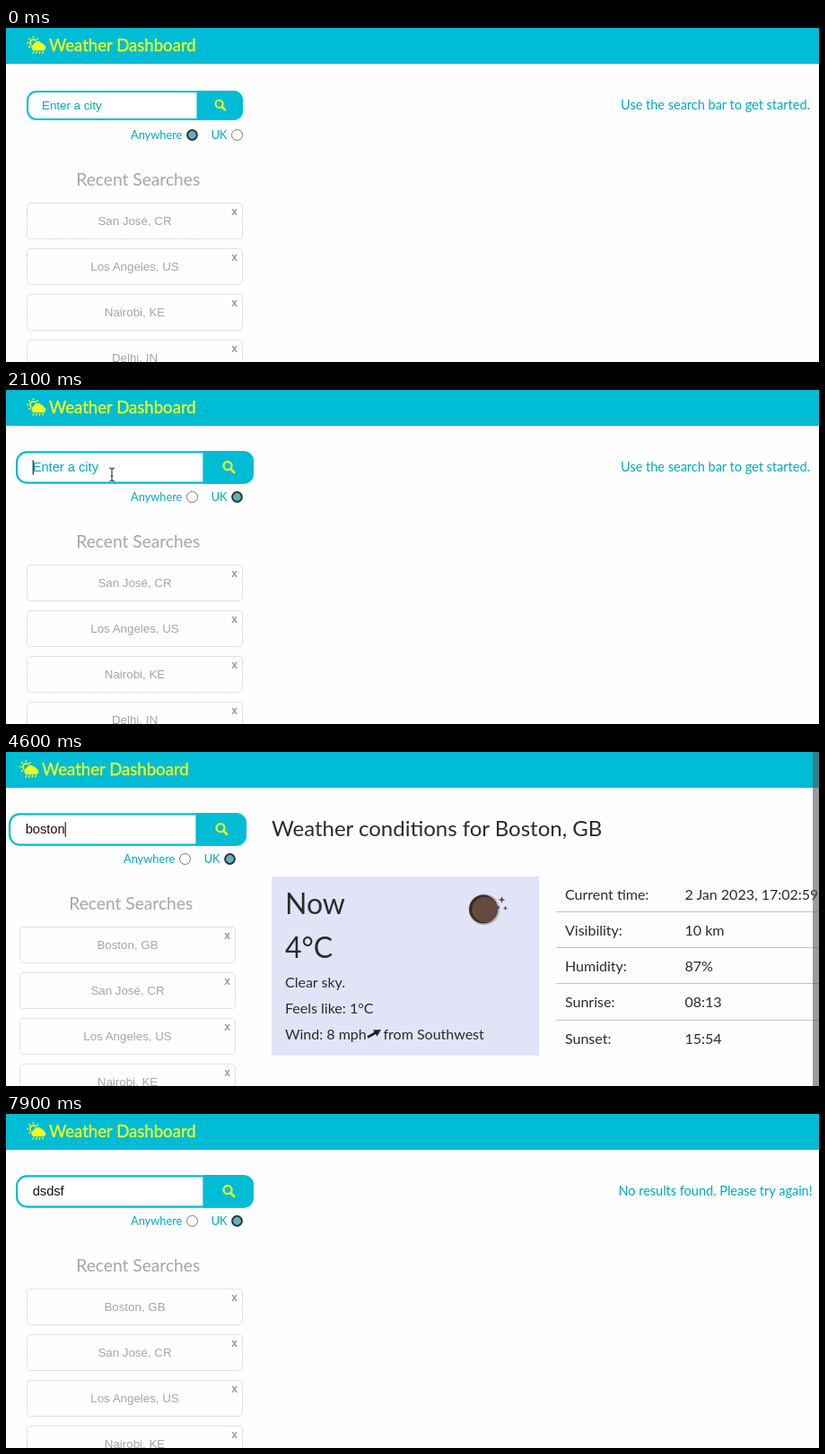
Animation of 906x373 px, one loop 8 s. Source, as an HTML page:

```html
<!DOCTYPE html>
<html lang="en">
<head>
<meta charset="utf-8">
<title>Weather Dashboard</title>
<style>
  html, body { margin: 0; width: 100%; height: 100%; overflow: hidden; background: #fefefe; }
  svg { display: block; width: 100%; height: 100%; }
  text { font-family: Lato, sans-serif; white-space: pre; }
  .ui { font-family: "Liberation Sans", Arial, sans-serif; font-size: 13.33px; }
  .title { font-size: 18.6px; fill: #f0fb20; stroke: #f0fb20; stroke-width: .35; }
  .cyan { fill: #00a9c0; }
  .message { font-size: 14.5px; text-anchor: middle; }
  .label { font-size: 12.8px; }
  .grey { fill: #a6a6a6; text-anchor: middle; }
  .recent { font-size: 19.2px; }
  .close { font-size: 12px; font-weight: 700; fill: #999; }
  .card { fill: none; stroke: #c4c4c4; stroke-dasharray: 1 1; }
  .dark { fill: #2b2b2b; font-size: 16px; }
  .heading { font-size: 24px; }
  .big { font-size: 32px; }
</style>
</head>
<body>
<svg id="stage" viewBox="0 0 906 373">
  <rect width="906" height="40" fill="#00bcd4"/>
  <g id="page">
    <g id="logo" fill="#f0fb20" stroke="#f0fb20">
      <circle cx="30.5" cy="16.5" r="3.6" fill="none" stroke-width="1.8"/>
      <g id="rays" stroke-width="1.7"></g>
      <path stroke="#00bcd4" stroke-width="1"
        d="M31 25.5a4 4 0 0 1-.3-7.8a5 5 0 0 1 8.8-1.5a3.2 3.2 0 0 1 3 2.5a3.5 3.5 0 0 1-.5 6.8z"/>
      <path d="M31 26l-.9 2.2M34.5 26l-.9 2.2M38 26l-.9 2.2M41.5 26l-.9 2.2" stroke-width="1.3" stroke-linecap="round"/>
    </g>
    <text class="title" x="48" y="26">Weather Dashboard</text>

    <g id="search">
      <rect x="24" y="71" width="239" height="31" rx="10" fill="#fff" stroke="#00bcd4" stroke-width="2"/>
      <path d="M212.5 70H254a10 10 0 0 1 10 10V93a10 10 0 0 1-10 10H212.5z" fill="#00bcd4"/>
      <circle cx="237.6" cy="84.8" r="4.1" fill="none" stroke="#f0fb20" stroke-width="2"/>
      <path d="M240.7 88l3.4 3.4" stroke="#f0fb20" stroke-width="2.5" stroke-linecap="round"/>
      <rect id="selection" x="40" y="78.7" height="15.4" fill="#b3d7fb"/>
      <text id="field" class="ui" x="40" y="91"></text>
      <rect id="caret" y="79" width="1" height="15" fill="#111"/>
    </g>

    <text class="cyan label" x="139" y="124">Anywhere</text>
    <circle id="anywhere" cx="207.5" cy="119.5"/>
    <text class="cyan label" x="228.7" y="124">UK</text>
    <circle id="uk" cx="257.5" cy="119.5"/>

    <text class="grey recent" x="147.3" y="176">Recent Searches</text>
    <g id="cards"></g>
  </g>

  <text id="message" class="cyan message" x="790.5" y="91"></text>

  <g id="results">
    <text class="dark heading" x="296" y="94.3">Weather conditions for Boston, GB</text>
    <rect x="296" y="139" width="298" height="200" fill="#e1e4f6"/>
    <text class="dark big" x="311" y="181">Now</text>
    <text class="dark big" x="311" y="230">4°C</text>
    <text class="dark" x="311" y="263">Clear sky.</text>
    <text class="dark" x="311" y="292">Feels like: 1°C</text>
    <text class="dark" x="311" y="320.5">Wind: 8 mph</text>
    <path d="M403 318.5l9-5" stroke="#222" stroke-width="2.6"/>
    <path d="M409 310.5l9-.5l-4.5 7.5z" fill="#222"/>
    <text class="dark" x="420.5" y="320.5">from Southwest</text>
    <circle cx="533" cy="176" r="17.3" fill="#b9b5b5"/>
    <circle cx="532" cy="175.5" r="16" fill="#382b27"/>
    <circle cx="533.5" cy="176" r="14.3" fill="#654a3e"/>
    <g id="stars" fill="#57504f"></g>
    <g id="table"></g>
    <rect x="899" width="7" height="373" fill="#555" opacity=".58"/>
  </g>

  <path id="arrow" d="M0 0V11.5L2.7 9L4.7 13.4L6.8 12.5L4.9 8.2H8.3z" fill="#111" stroke="#fff" stroke-width=".8"/>
  <path id="beam" d="M-3-7q3 0 3 2.5q0-2.5 3-2.5M0-5V6M-3 8q3 0 3-2.5q0 2.5 3 2.5M-1.5 2h3" fill="none" stroke="#333" stroke-width="1.1"/>
</svg>
<script>
const LOOP = 8000, STEP = 100;
const $ = id => document.getElementById(id);

function add(parent, tag, attrs, text = "") {
  const node = document.createElementNS("http://www.w3.org/2000/svg", tag);
  for (const key in attrs) node.setAttribute(key, attrs[key]);
  node.textContent = text;
  parent.append(node);
  return node;
}
const show = (node, on) => node.style.display = on ? "" : "none";

for (let i = 0; i < 8; i++) {
  add($("rays"), "path", { d: "M30.5 11.2V9.2", transform: `rotate(${i * 45} 30.5 16.5)` });
}

const cityLabels = [0, 1, 2, 3].map(i => {
  const y = 195 + 51 * i;
  add($("cards"), "rect", { class: "card", x: 23.5, y: y + .5, width: 240, height: 40, rx: 4 });
  add($("cards"), "text", { class: "ui grey close", x: 254.5, y: y + 14 }, "x");
  return add($("cards"), "text", { class: "ui grey", x: 143.5, y: y + 25 });
});

for (const [x, y, r] of [[552.5, 165, 4], [548.5, 173.5, 2.5], [556.5, 174.5, 2.7]]) {
  const d = r * .28;
  add($("stars"), "path", { d: `M${x} ${y - r}l${d} ${r - d}l${r - d} ${d}l${d - r} ${d}l${-d} ${r - d}l${-d} ${d - r}l${d - r} ${-d}l${r - d} ${-d}z` });
}

const rows = [["Current time:", ""], ["Visibility:", "10 km"], ["Humidity:", "87%"],
              ["Sunrise:", "08:13"], ["Sunset:", "15:54"]];
const values = rows.map(([name, value], i) => {
  const y = 164.8 + 40.2 * i;
  if (i) add($("table"), "path", { d: `M613 ${Math.round(y - 27) + .5}H906`, stroke: "#c2c2c2" });
  add($("table"), "text", { class: "dark", x: 623, y }, name);
  return add($("table"), "text", { class: "dark", x: 756.5, y }, value);
});

const START = "Use the search bar to get started.";
const NONE = "No results found. Please try again!";

// start, typed text, caret (1) or selection (2), message, clock when results are open
const scenes = [
  [0, "", 0, START], [2000, "", 1, START], [2600, "", 0, START],
  [3000, "b", 1, START], [3100, "bo", 1, START], [3400, "bos", 1, START],
  [3600, "bost", 1, START], [4000, "boston", 1, START], [4200, "boston", 1, ""],
  [4300, "boston", 0, "", "02:59"], [4600, "boston", 1, "", "02:59"],
  [5000, "boston", 0, "", "03:00"], [5500, "boston", 1, "", "03:00"],
  [6000, "boston", 2, "", "03:01"], [6500, "d", 1, "", "03:01"],
  [7000, "dsd", 1, "", "03:02"], [7200, "dsdsf", 1, "", "03:02"],
  [7400, "dsdsf", 1, NONE], [7900, "dsdsf", 0, NONE]
];

// time, x, y
const mousePath = [[300, 560, 330], [600, 355, 212], [900, 270, 141], [1100, 258, 121],
                   [1400, 256, 120], [1700, 185, 106], [2000, 122, 94], [2100, 118, 94]];

function mouseAt(t) {
  const i = mousePath.findIndex(point => point[0] > t);
  if (i < 0) return mousePath.at(-1).slice(1);
  const [t0, x0, y0] = mousePath[i - 1], [t1, x1, y1] = mousePath[i];
  const k = (t - t0) / (t1 - t0);
  return [x0 + (x1 - x0) * k, y0 + (y1 - y0) * k];
}

function setRadio(node, on) {
  node.setAttribute("r", on ? 5.4 : 6);
  node.setAttribute("fill", on ? "#5cb3bd" : "#fff");
  node.setAttribute("stroke", on ? "#30383a" : "#777");
  node.setAttribute("stroke-width", on ? 2 : 1);
}

function render(t) {
  const [, typed, caret, message, clock] = scenes.findLast(scene => scene[0] <= t);
  const open = Boolean(clock), field = $("field");

  $("page").setAttribute("transform", `translate(${open ? -8 : 0})`);
  const zoom = t < 2000 ? 1 : t < 2100 ? 1.07 : 1.1;
  $("search").setAttribute("transform", `translate(143.5 86.5) scale(${zoom}) translate(-143.5 -86.5)`);
  field.textContent = typed || "Enter a city";
  field.setAttribute("fill", typed ? "#111" : "#00a9c0");
  const width = typed ? field.getComputedTextLength() : 0;
  $("caret").setAttribute("x", 40 + width);
  $("selection").setAttribute("width", width);
  show($("caret"), caret === 1);
  show($("selection"), caret === 2);

  setRadio($("anywhere"), t < 1200);
  setRadio($("uk"), t >= 1200);

  const cities = ["San José, CR", "Los Angeles, US", "Nairobi, KE", "Delhi, IN"];
  if (t >= 4300) cities.unshift("Boston, GB");
  cityLabels.forEach((label, i) => label.textContent = cities[i]);

  $("message").textContent = message;
  show($("results"), open);
  if (open) values[0].textContent = `2 Jan 2023, 17:${clock}`;

  const visible = t >= 300 && t < 3000, typing = t >= 1800;
  show($("arrow"), visible && !typing);
  show($("beam"), visible && typing);
  if (visible) $(typing ? "beam" : "arrow").setAttribute("transform", `translate(${mouseAt(t)})`);
}

const began = performance.now();
function tick() {
  const t = (performance.now() - began) % LOOP;
  render(Math.floor(t / STEP) * STEP);
  requestAnimationFrame(tick);
}
tick();
</script>
</body>
</html>
```
